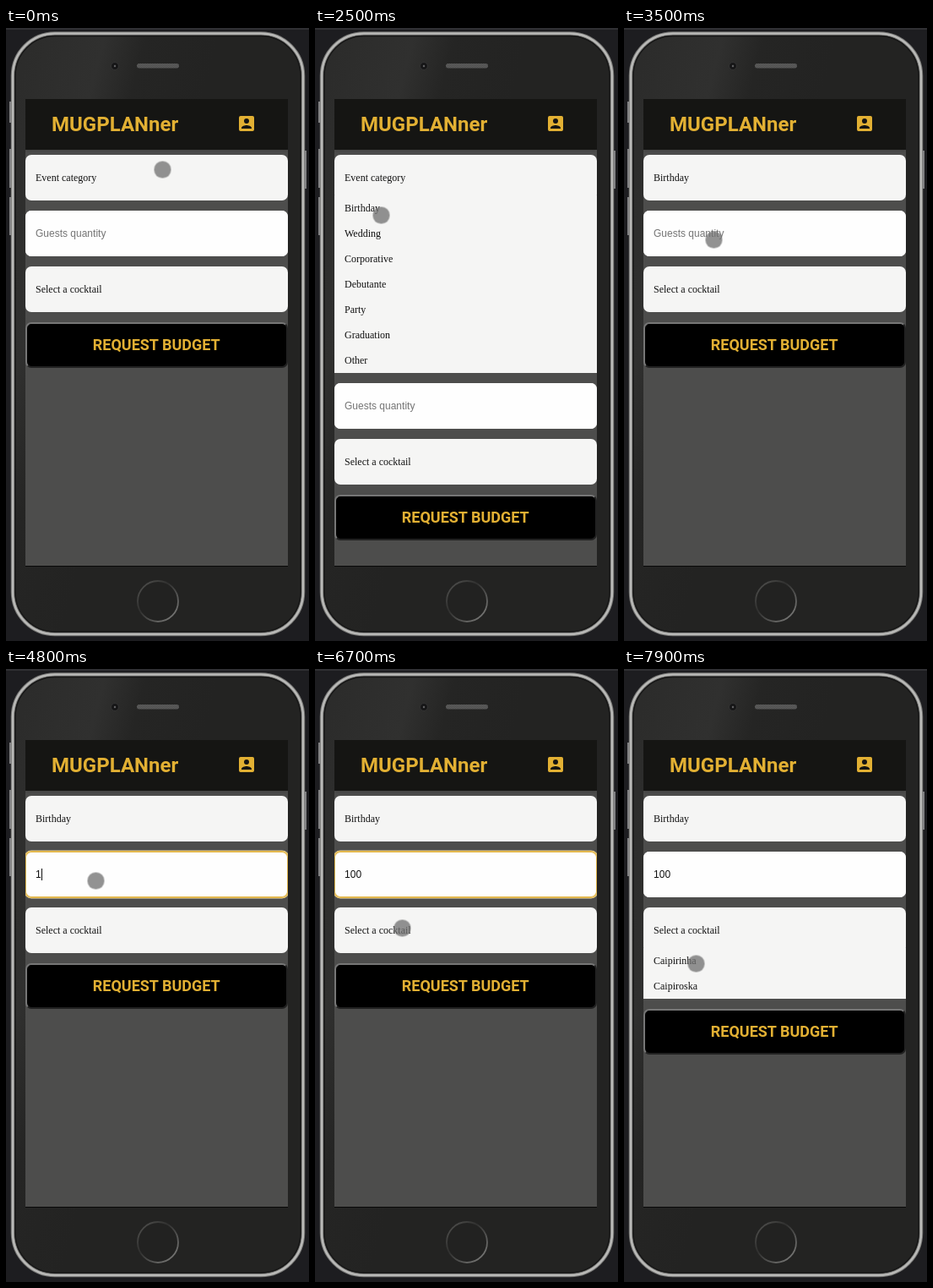
Recreate the animation shown at these times as an HTML page. Size 359 by 725 pixels, loop 8 s.

```html
<!DOCTYPE html>
<html lang="en">
<head>
<meta charset="utf-8">
<title>Budget request form</title>
<style>
  html, body { margin: 0; width: 100%; height: 100%; overflow: hidden; background: #1d1d20; }
  #stage { position: relative; width: 359px; height: 725px; overflow: hidden; --gold: #e2b033; --loop: 8s step-end infinite; }
  #stage > svg { position: absolute; inset: 0; }
  #screen {
    position: absolute; left: 23px; top: 84px; width: 311px; height: 552px;
    overflow: hidden; background: #4d4d4c; border-bottom: 1px solid #080808;
    font: 12px/54px "Liberation Serif", serif; color: #111; white-space: nowrap;
  }
  #screen div, #screen span { position: absolute; box-sizing: border-box; }

  #screen .header {
    left: 0; top: 0; width: 311px; height: 60px; background: #151513;
    box-shadow: 0 1px 4px #3338; color: var(--gold);
    font: 700 24px/60px Roboto, sans-serif;
  }
  .header span { left: 31px; }
  .header svg { position: absolute; left: 249.5px; top: 17px; fill: var(--gold); }

  #screen .card { left: 0; width: 310.5px; height: 54px; border-radius: 7px; background: #f5f5f4; }
  .card span { left: 12px; }
  .event { top: 66px; }
  .guests { top: 132px; }
  .cocktail { top: 198px; }
  #screen .guests .input { inset: 0; border-radius: 7px; background: #fefefe; font-family: "Liberation Sans", Arial, sans-serif; }
  #screen .menu { left: 0; top: 48px; width: 310.5px; padding-left: 12px; background: #f5f5f4; line-height: 30px; }
  #screen .button {
    left: 0; top: 264px; width: 310.5px; height: 54px; border: 2px outset #767676; border-radius: 7px;
    background: #000; color: var(--gold); text-align: center;
    font: 700 18px/50px Roboto, sans-serif;
  }

  .placeholder { color: #757575; }
  #screen .digits { display: flex; }
  #screen .digits i { font-style: normal; }
  #screen .ring { inset: 0; border-radius: 7px; box-shadow: inset 0 0 0 1px #e3b84e, 0 0 0 1px #e3b84e, 0 0 0 1.5px #f1dfad; }
  #screen .caret { left: 12px; top: 20px; width: 1px; height: 14px; background: #111; }
  #cursor { position: absolute; left: -9.75px; top: -9.75px; width: 19.5px; height: 19.5px; border-radius: 50%; background: rgba(112, 112, 112, .76); }

  .event .menu { animation: event-menu var(--loop); }
  .unset { animation: unset-label var(--loop); }
  .chosen { animation: chosen-label var(--loop); }
  .guests, .cocktail { animation: below-event var(--loop); }
  .button { animation: button-drop var(--loop); }
  .placeholder { animation: placeholder var(--loop); }
  .digits i:nth-child(1) { animation: digit-1 var(--loop); }
  .digits i:nth-child(2) { animation: digit-2 var(--loop); }
  .digits i:nth-child(3) { animation: digit-3 var(--loop); }
  .ring { animation: focus var(--loop); }
  .caret { animation: blink var(--loop), caret-move var(--loop); }
  .cocktail .menu { animation: cocktail-menu var(--loop); }
  #cursor { animation: pointer var(--loop); }

  @keyframes event-menu { 0% { opacity: 0 } 16.25% { opacity: 1 } 37.5%, 100% { opacity: 0 } }
  @keyframes unset-label { 0% { opacity: 1 } 37.5%, 100% { opacity: 0 } }
  @keyframes chosen-label { 0% { opacity: 0 } 37.5%, 100% { opacity: 1 } }
  @keyframes below-event {
    0% { transform: none } 16.25% { transform: translateY(204px) } 37.5%, 100% { transform: none }
  }
  @keyframes button-drop {
    0% { transform: none } 16.25% { transform: translateY(204px) }
    37.5% { transform: none } 86.25%, 100% { transform: translateY(54px) }
  }
  @keyframes placeholder { 0% { opacity: 1 } 60%, 100% { opacity: 0 } }
  @keyframes digit-1 { 0% { opacity: 0 } 60%, 100% { opacity: 1 } }
  @keyframes digit-2 { 0% { opacity: 0 } 63.75%, 100% { opacity: 1 } }
  @keyframes digit-3 { 0% { opacity: 0 } 65%, 100% { opacity: 1 } }
  @keyframes focus { 0% { opacity: 0 } 51.25% { opacity: 1 } 86.25%, 100% { opacity: 0 } }
  @keyframes blink {
    0% { opacity: 0 } 51.25% { opacity: 1 } 55% { opacity: 0 } 60% { opacity: 1 }
    71.25% { opacity: 0 } 78.75% { opacity: 1 } 83.75%, 100% { opacity: 0 }
  }
  @keyframes caret-move {
    0% { transform: none } 60% { transform: translateX(6.5px) }
    63.75% { transform: translateX(13px) } 65%, 100% { transform: translateX(20px) }
  }
  @keyframes cocktail-menu { 0% { opacity: 0 } 86.25%, 100% { opacity: 1 } }
  @keyframes pointer {
    0% { transform: translate(185.5px, 167.5px) }
    23.75% { transform: translate(160px, 189px) }
    25% { transform: translate(120px, 222px) }
    26.25% { transform: translate(99.5px, 235.5px) }
    28.75% { transform: translate(91px, 229px) }
    30% { transform: translate(82px, 223px) }
    31.25% { transform: translate(78.5px, 221.5px) }
    38.75% { transform: translate(90px, 231px) }
    40% { transform: translate(100.5px, 239.5px) }
    43.75% { transform: translate(106.5px, 250.5px) }
    78.75% { transform: translate(103px, 303px) }
    81.25% { transform: translate(103px, 305.5px) }
    83.75% { transform: translate(103.5px, 306.5px) }
    93.75% { transform: translate(99px, 320px) }
    95% { transform: translate(91px, 337px) }
    96.25% { transform: translate(87.5px, 344.5px) }
    98.75%, 100% { transform: translate(85.5px, 348.5px) }
  }
</style>
</head>
<body>
<div id="stage">
  <svg width="359" height="725">
    <defs>
      <linearGradient id="shell" x1="0" y1="0" x2=".55" y2=".3">
        <stop offset="0" stop-color="#2b2b2a"/>
        <stop offset=".45" stop-color="#30302f"/>
        <stop offset=".65" stop-color="#252524"/>
        <stop offset="1" stop-color="#232322"/>
      </linearGradient>
      <linearGradient id="home" x1="0" y1="0" x2="1" y2="1">
        <stop offset="0" stop-color="#565654"/>
        <stop offset=".4" stop-color="#30302f"/>
        <stop offset="1" stop-color="#858583"/>
      </linearGradient>
      <pattern id="mesh" width="2" height="2" patternUnits="userSpaceOnUse">
        <rect width="2" height="2" fill="#484847"/>
        <path d="M0 2L2 0" stroke="#777" stroke-width=".6"/>
      </pattern>
    </defs>
    <rect width="359" height="2" fill="#303034"/>
    <path d="M5.5 87v25M5.5 143v46M5.5 200v45M354.5 145v45" stroke="#858587" stroke-width="3"/>
    <rect x="8" y="6.5" width="344" height="710.5" rx="50" fill="url(#shell)" stroke="#777775" stroke-width="4.5"/>
    <rect x="8" y="6.5" width="344" height="710.5" rx="50" fill="none" stroke="#b9b9b7" stroke-width="2.5"/>
    <rect x="11" y="9.5" width="338" height="704.5" rx="47" fill="none" stroke="#171717" stroke-width="1.5"/>
    <circle cx="129" cy="45" r="4.5" fill="#161617" stroke="#343434"/>
    <circle cx="129" cy="45" r="1.2" fill="#626264"/>
    <rect x="155" y="42" width="50" height="5.5" rx="2.7" fill="url(#mesh)"/>
    <circle cx="180" cy="678" r="24" fill="#222221" stroke="url(#home)" stroke-width="1.8"/>
  </svg>

  <div id="screen">
    <div class="header">
      <span>MUGPLANner</span>
      <svg width="24" height="24" viewBox="0 0 24 24" fill-rule="evenodd">
        <path d="M5 3h14a2 2 0 0 1 2 2v14a2 2 0 0 1-2 2H5a2 2 0 0 1-2-2V5a2 2 0 0 1 2-2zM12 6a3 3 0 0 0 0 6a3 3 0 0 0 0-6zM6 18h12v-1c0-2-4-3.1-6-3.1S6 15 6 17z"/>
      </svg>
    </div>
    <div class="card event">
      <span class="unset">Event category</span>
      <span class="chosen">Birthday</span>
      <div class="menu">Birthday<br>Wedding<br>Corporative<br>Debutante<br>Party<br>Graduation<br>Other</div>
    </div>
    <div class="card guests">
      <div class="input">
        <span class="placeholder">Guests quantity</span>
        <span class="digits"><i>1</i><i>0</i><i>0</i></span>
        <div class="ring"></div>
        <div class="caret"></div>
      </div>
    </div>
    <div class="card cocktail">
      <span>Select a cocktail</span>
      <div class="menu">Caipirinha<br>Caipiroska</div>
    </div>
    <div class="button">REQUEST BUDGET</div>
  </div>
  <div id="cursor"></div>
</div>
</body>
</html>
```
